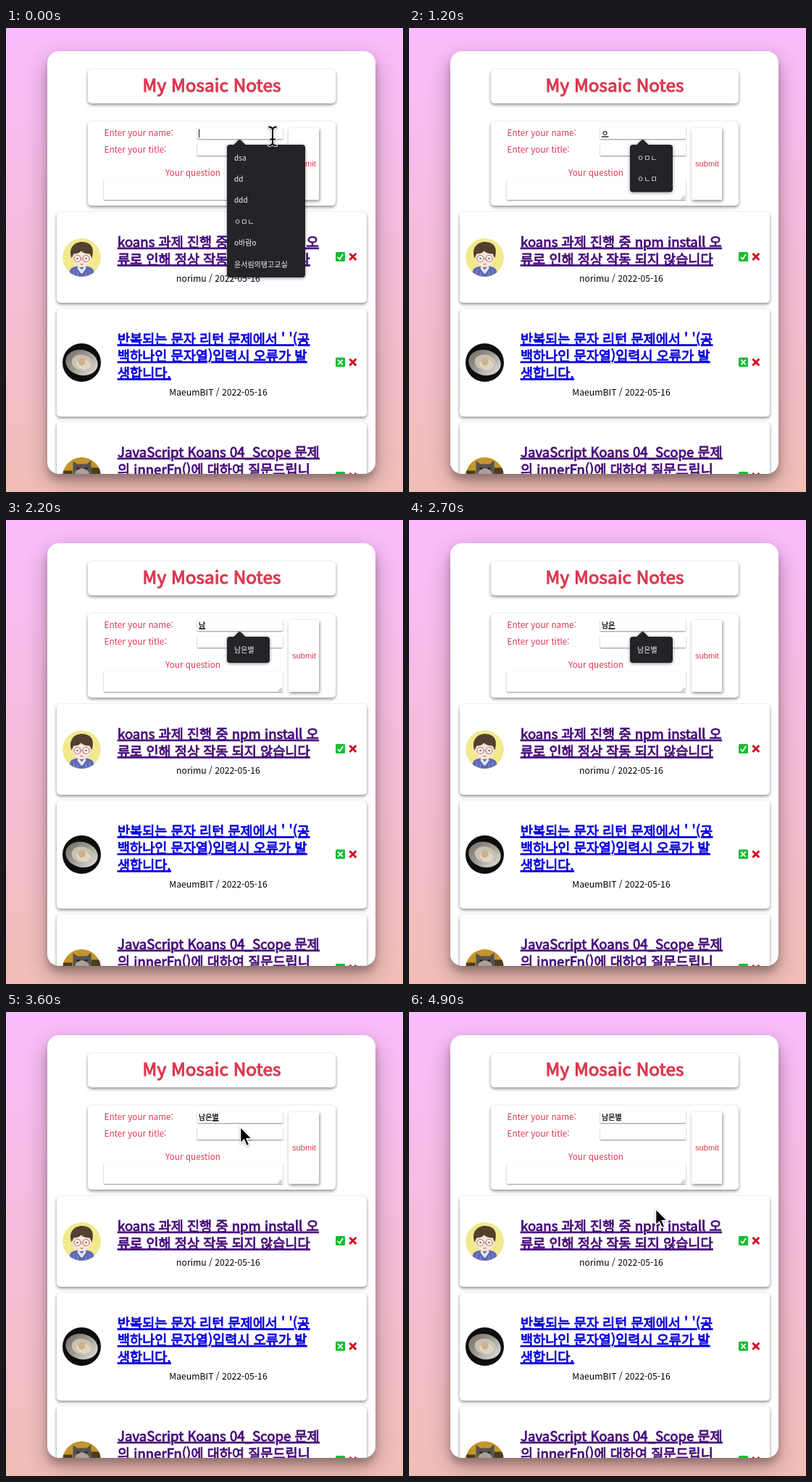
Write an HTML page that moves like this. It is 548 by 640 pixels and loops after 5000 ms.

```html
<!DOCTYPE html>
<html lang="ko">
<head>
<meta charset="utf-8">
<title>Question board</title>
<style>
html, body { margin: 0; width: 100%; height: 100%; overflow: hidden; }
body { position: relative; background: linear-gradient(#fabcfd, #f6bcd9 50%, #f1beb6); }
.panel {
  position: absolute; left: 57px; top: 32px; width: 453px; height: 583px;
  border-radius: 16px; background: #fff;
  box-shadow: 0 11px 30px rgba(0,0,0,.3), 0 8px 10px rgba(0,0,0,.2);
}
.clip { position: absolute; inset: 0; overflow: hidden; border-radius: 16px; }
.box {
  position: absolute; box-sizing: border-box; background: #fff;
  border-radius: 5px; box-shadow: 0 2px 4px rgba(0,0,0,.46);
}
.field { border-radius: 1px; box-shadow: 0 1px 2px rgba(0,0,0,.45); }
.button { border-radius: 1px; box-shadow: 1px 2px 4px rgba(0,0,0,.45); }
svg { position: absolute; left: 0; top: 0; }
text { font-family: "Noto Sans CJK KR", "Noto Sans KR", "Noto Sans", sans-serif; white-space: pre; }
.red { fill: #db3850; }
.h1 { font-size: 24.4px; text-anchor: middle; stroke: #db3850; stroke-width: 1.1; }
.label { font-size: 11.75px; }
.link {
  font-size: 18.6px; fill: #450c79; stroke: #450c79; stroke-width: .85;
  text-decoration: underline; text-decoration-thickness: 1px; text-decoration-skip-ink: none;
}
.new { fill: #0a00dc; stroke: #0a00dc; }
.by { font-size: 12.2px; text-anchor: middle; }
.submit { font: 11.2px "Liberation Sans", Arial, sans-serif; text-anchor: middle; }
.typed, .menu text { font-size: 10px; }
.typed { stroke: #000; stroke-width: .25; }
.menu text { fill: #f2f2f2; }
.menu { filter: drop-shadow(0 1px 2px rgba(0,0,0,.45)); }
.cursor { filter: drop-shadow(0 1.5px 1.5px rgba(0,0,0,.35)); }
#tail { text-decoration: underline; }
</style>
</head>
<body>
<div class="panel"><div class="clip" id="boxes"></div></div>

<svg width="548" height="640" viewBox="0 0 548 640">
  <defs>
    <clipPath id="panel"><rect x="57" y="32" width="453" height="583" rx="16"/></clipPath>
    <clipPath id="round"><circle r="26.5"/></clipPath>
    <linearGradient id="plate" x2="1" y2=".5">
      <stop offset="0" stop-color="#6f6a62"/><stop offset=".6" stop-color="#a19d95"/><stop offset="1" stop-color="#d2d0ca"/>
    </linearGradient>
    <g id="cross">
      <path d="M-4.5-4.5 4.5 4.5M4.5-4.5-4.5 4.5" fill="none" stroke="#d50a20" stroke-width="3"/>
    </g>
    <rect id="tile" x="-6.5" y="-6.5" width="13" height="13" rx="1.5" fill="#13bd32"/>
    <path id="ibeam" d="M-5-12.5Q0-12.5 0-8V8.5Q0 13 -5 13M5-12.5Q0-12.5 0-8M0 8.5Q0 13 5 13M-3 4.5H3"/>
  </defs>

  <g clip-path="url(#panel)">
    <text class="h1 red" x="284" y="88">My Mosaic Notes</text>
    <text class="label red" x="135.5" y="149">Enter your name:</text>
    <text class="label red" x="135.5" y="171.5">Enter your title:</text>
    <text class="label red" x="220" y="204">Your question</text>
    <text class="submit red" x="411.5" y="191">submit</text>
    <path d="M376 236.5l5-5M379 236.5l2-2" stroke="#666" stroke-width=".9"/>

    <text class="link" x="154" y="302">koans 과제 진행 중 npm install 오</text>
    <text class="link" x="154" y="325.5">류로 인해 정상 작동 되지 않습니다</text>
    <text class="by" x="293" y="350">norimu / 2022-05-16</text>
    <text class="link new" x="154" y="435.5">반복되는 문자 리턴 문제에서 ' '(공</text>
    <text class="link new" x="154" y="459">백하나인 문자열)입력시 오류가 발</text>
    <text class="link new" x="154" y="482.5">생합니다.</text>
    <text class="by" x="293" y="507">MaeumBIT / 2022-05-16</text>
    <text class="link" x="154" y="592">JavaScript Koans 04_Scope 문제</text>
    <text class="link" x="154" y="615.5">의 innerFn()에 대하여 질문드립니</text>

    <g transform="translate(104.5 316.5)"><g clip-path="url(#round)">
      <circle r="26.5" fill="#f1e98e"/>
      <path d="M-17 28V20Q-16 13-6 12H6Q16 13 17 20V28z" fill="#5f68b4"/>
      <path d="M-5 11L0 17 5 11 6 15 1 22H-1L-6 15z" fill="#e6e8f3"/>
      <path d="M-11 17V28M-6 20V28M6 20V28M11 17V28" stroke="#8d97ce"/>
      <ellipse cy="1" rx="12.5" ry="12.5" fill="#f8e6d6"/>
      <path d="M-14 1C-19-13-10-22 1-21.5C14-21 18-12 14 1L11-5Q3-5-1-9Q-4-5-11-5z" fill="#54402f"/>
      <g fill="#fff" fill-opacity=".5" stroke="#c2748a" stroke-width="1.2">
        <circle cx="-6" cy="1.5" r="4.5"/><circle cx="6" cy="1.5" r="4.5"/><path d="M-1.5 1.5H1.5"/>
      </g>
      <circle cx="-6" cy="1.5" r="1.1" fill="#333"/><circle cx="6" cy="1.5" r="1.1" fill="#333"/>
      <path d="M-2 9Q0 10.5 2 9" fill="none" stroke="#b8574f"/>
    </g></g>

    <g transform="translate(104.5 461.5)">
      <circle r="26.5" fill="#0e0d0d"/>
      <g transform="rotate(14)">
        <ellipse rx="22.5" ry="17.5" fill="url(#plate)"/>
        <ellipse cx="1" rx="15" ry="11" fill="#c9c1b2"/>
        <ellipse cx="3" cy="2" rx="10" ry="7" fill="#dcd5c8"/>
        <circle cx="0" cy="-1" r="5" fill="#cfb083"/>
      </g>
    </g>

    <g transform="translate(104.5 618.5)"><g clip-path="url(#round)">
      <circle r="26.5" fill="#c4952a"/>
      <path d="M-26-8H-13V4H-26zM13-12H26V4H13z" fill="#4b3b20"/>
      <path d="M-12 6V-21L-6-17H7L13-22V6z" fill="#575252"/>
      <path d="M-9-6Q0-16 10-6V6H-9z" fill="#aaa196"/>
      <path d="M-7-11H-3M4-11H8" stroke="#1d1a1a" stroke-width="2"/>
    </g></g>

    <g fill="none" stroke="#fff" stroke-width="1.8">
      <use href="#tile" x="461.5" y="315.5" stroke="none"/>
      <path d="M457.8 316l2.7 3 4.7-7"/>
      <use href="#tile" x="461.5" y="461" stroke="none"/>
      <path d="M458.2 457.7l6.6 6.6m0-6.6l-6.6 6.6"/>
      <use href="#tile" x="461.5" y="618.5" stroke="none"/>
    </g>
    <use href="#cross" x="478.8" y="315.5"/>
    <use href="#cross" x="478.8" y="461"/>
    <use href="#cross" x="478.8" y="618.5"/>
  </g>

  <text class="typed" id="typed" x="266" y="148.5"><tspan id="head"></tspan><tspan id="tail"></tspan></text>
  <path id="caret" stroke="#111" d="M0 0V12"/>
  <g class="menu" id="menu">
    <path d="M314 161.5L320.5 155Q322.5 153 324.5 155L331 161.5z" fill="#222428"/>
    <rect id="sheet" x="305" y="161" rx="4" fill="#222428"/>
    <g id="rows"></g>
  </g>
  <g class="cursor" id="arrow">
    <path d="M.5 .5V23L5.5 18.3 9 26.6 12.8 25 9.3 16.8H16.4z" fill="#000" stroke="#fff" stroke-width="1.5"/>
  </g>
  <g class="cursor" id="beam" fill="none" stroke-linecap="round">
    <use href="#ibeam" stroke="#fff" stroke-width="4"/>
    <use href="#ibeam" stroke="#000" stroke-width="2"/>
  </g>
</svg>

<script>
const $ = id => document.getElementById(id);
const LOOP = 5000;

function box(x, y, w, h, kind = "") {
  const el = document.createElement("div");
  el.className = "box " + kind;
  el.style.cssText = `left:${x - 57}px;top:${y - 32}px;width:${w}px;height:${h}px`;
  $("boxes").append(el);
}
box(113, 57, 342, 47);
box(113, 129, 342, 116);
box(264, 137, 118, 16, "field");
box(264, 160, 118, 16, "field");
box(135, 209, 247, 28, "field");
box(390, 138, 42, 99, "button");
box(70, 254, 428, 124.5);
box(70, 387, 428, 148.5);
box(70, 544, 428, 149);

const menus = {
  all: ["dsa", "dd", "ddd", "ㅇㅁㄴ", "o바람o", "윤서림의탱고교실"],
  jamo: ["ㅇㅁㄴ", "ㅇㄴㅁ"],
  name: ["남은별"]
};

// time, settled text, syllable being composed, open menu
const typing = [
  [0, "", "", "all"],
  [300, "", "ㅇ", "jamo"],
  [1900, "", "", ""],
  [2000, "", "ㄴ", ""],
  [2100, "", "나", ""],
  [2200, "", "남", "name"],
  [2400, "남", "ㅇ", "name"],
  [2500, "남", "으", "name"],
  [2600, "남", "은", "name"],
  [2900, "남은", "ㅂ", "name"],
  [3000, "남은", "벼", "name"],
  [3200, "남은", "별", ""],
  [3900, "남은별", "", ""]
];

// time, x, y of the pointer
const path = [[3300, 345, 150], [3600, 323, 158], [3900, 323, 168], [4200, 326, 192], [4900, 340, 271], [5000, 340, 271]];

function pointer(t) {
  if (t < 300) return [368, 149, true];
  if (t < 3300) return null;
  const i = path.findIndex(p => p[0] > t);
  const [a, b] = [path[i - 1], path[i]];
  const k = (t - a[0]) / (b[0] - a[0]);
  const x = a[1] + (b[1] - a[1]) * k, y = a[2] + (b[2] - a[2]) * k;
  return [x, y, y < 154 || (y > 161 && y < 176)];
}

const show = (el, on) => el.style.display = on ? "" : "none";
const move = (el, x, y) => el.setAttribute("transform", `translate(${x} ${y})`);

let step = null;
function setStep(next) {
  if (next === step) return;
  step = next;
  const [, head, tail, menu] = step;
  $("head").textContent = head;
  $("tail").textContent = tail;
  show($("menu"), menu);
  if (!menu) return;
  const rows = menus[menu];
  $("sheet").setAttribute("width", menu === "all" ? 108 : 59);
  $("sheet").setAttribute("height", 6.5 + 29.4 * rows.length);
  $("rows").innerHTML = rows.map((r, i) => `<text x="315" y="${182.5 + 29.4 * i}">${r}</text>`).join("");
}

function draw(now) {
  const t = Math.floor((now % LOOP) / 100) * 100;
  setStep(typing.findLast(s => s[0] <= t));

  const inTitle = t >= 3900;
  const since = inTitle ? 3950 : t < 300 ? 0 : 300;
  const blink = t >= since && (t - since) % 1000 < 500;
  show($("caret"), blink && (inTitle || t < 1900));
  const x = inTitle || t < 300 ? 266.5 : 266 + $("typed").getComputedTextLength();
  move($("caret"), x, inTitle ? 162 : 139.5);

  const p = pointer(t);
  show($("arrow"), p && !p[2]);
  show($("beam"), p && p[2]);
  if (p) move(p[2] ? $("beam") : $("arrow"), p[0], p[1]);
}

const start = performance.now();
function tick() {
  draw(performance.now() - start);
  requestAnimationFrame(tick);
}
tick();
</script>
</body>
</html>
```
